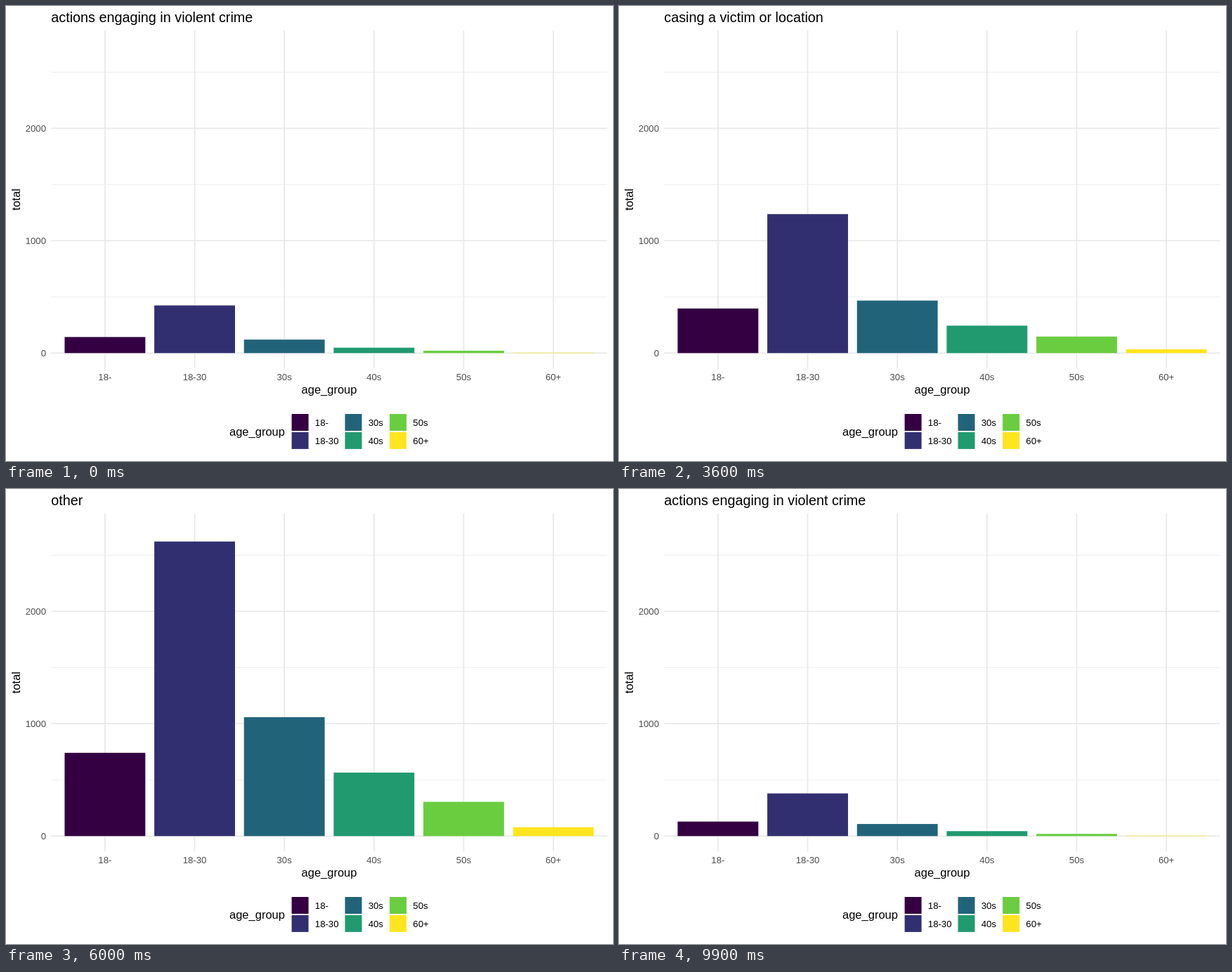
Recreate the animation shown at these times as an HTML page. Size 864 px wide and 648 px high, loop 10 s.

```html
<!DOCTYPE html>
<html lang="en">
<head>
<meta charset="utf-8">
<title>Totals by age group</title>
<style>
  html, body { margin: 0; width: 100%; height: 100%; overflow: hidden; background: #fff; }
  svg { display: block; width: 864px; height: 648px; }
  text { font: 13.2px "Liberation Sans", Arial, Helvetica, sans-serif; }
  .title { font-size: 19.8px; }
  .label { font-size: 16.5px; }
  .tick { fill: #4d4d4d; }
  .grid line { stroke: #e7e7e7; stroke-width: 1.6; }
  .grid .minor { stroke-width: .8; }
</style>
</head>
<body>
<svg viewBox="0 0 864 648">
  <text id="title" class="title" x="64.3" y="22.6"></text>
  <g id="grid" class="grid"></g>
  <g id="bars"></g>
  <g id="labels"></g>
  <text class="label" x="460" y="552" text-anchor="middle">age_group</text>
  <text class="label" transform="translate(20 275.6) rotate(-90)" text-anchor="middle">total</text>
  <text class="label" x="318" y="612">age_group</text>
  <g id="legend"></g>
</svg>
<script>
const groups = ['18-', '18-30', '30s', '40s', '50s', '60+'];
const colors = ['#340042', '#322f71', '#21647a', '#219a70', '#6acd40', '#fde51e'];
const states = [
  ['actions engaging in violent crime', 143, 424, 120, 48, 21, 4],
  ['actions indicative of drug transaction', 34, 229, 104, 46, 57, 15],
  ['carrying suspicious object', 140, 500, 190, 90, 45, 5],
  ['casing a victim or location', 246, 863, 334, 180, 114, 17],
  ['fits a relevant description', 1000, 2733, 1000, 500, 280, 102],
  ['furtive movements', 333, 1238, 383, 169, 89, 20],
  ['other', 741, 2622, 1058, 565, 305, 79],
  ['suspcious bulge', 112, 484, 183, 73, 38, 4],
  ['suspect acting as a lookout', 150, 500, 210, 115, 68, 14],
  ['wearing clothes commonly used in crime', 73, 202, 58, 28, 14, 4]
];
const left = 64.3, right = 855.7, top_ = 35, bottom = 516.2, zero = 494.3;
const unit = (right - left) / 6.2, perCount = .16, barWidth = unit * .9;
const centerX = i => left + unit * (i + .6);

const $ = id => document.getElementById(id);
function add(parent, tag, attrs, text) {
  const el = document.createElementNS('http://www.w3.org/2000/svg', tag);
  for (const key in attrs) el.setAttribute(key, attrs[key]);
  if (text !== undefined) el.textContent = text;
  return $(parent).appendChild(el);
}

for (let n = 0; n <= 2500; n += 500) {
  const y = zero - n * perCount, major = n % 1000 === 0;
  add('grid', 'line', { x1: left, x2: right, y1: y, y2: y, class: major ? 'major' : 'minor' });
  if (major) add('labels', 'text', { x: 57, y: y + 4.7, 'text-anchor': 'end', class: 'tick' }, n);
}

const bars = groups.map((name, i) => {
  const x = centerX(i), fill = colors[i];
  add('grid', 'line', { x1: x, x2: x, y1: top_, y2: bottom });
  add('labels', 'text', { x, y: 533, 'text-anchor': 'middle', class: 'tick' }, name);

  const keyX = [406.6, 482.5, 546.1][i >> 1], row = i % 2 * 25.9;
  add('legend', 'rect', { x: keyX, y: 581 + row, width: 24, height: 24, fill });
  add('legend', 'text', { x: keyX + 33.2, y: 598 + row }, name);
  return add('bars', 'rect', { x: x - barWidth / 2, width: barWidth, fill });
});

// Each second: hold for six ticks, then move linearly to the next state.
function draw(now) {
  const tick = Math.floor(now / 100) % 100;
  const index = Math.floor(tick / 10);
  const mix = Math.max(0, tick % 10 - 5) / 5;
  const from = states[index], to = states[(index + 1) % states.length];
  $('title').textContent = (mix < .5 ? from : to)[0];
  bars.forEach((bar, i) => {
    const height = (from[i + 1] + (to[i + 1] - from[i + 1]) * mix) * perCount;
    bar.setAttribute('y', zero - height);
    bar.setAttribute('height', height);
  });
}

function loop() {
  draw(performance.now());
  requestAnimationFrame(loop);
}
loop();
</script>
</body>
</html>
```
